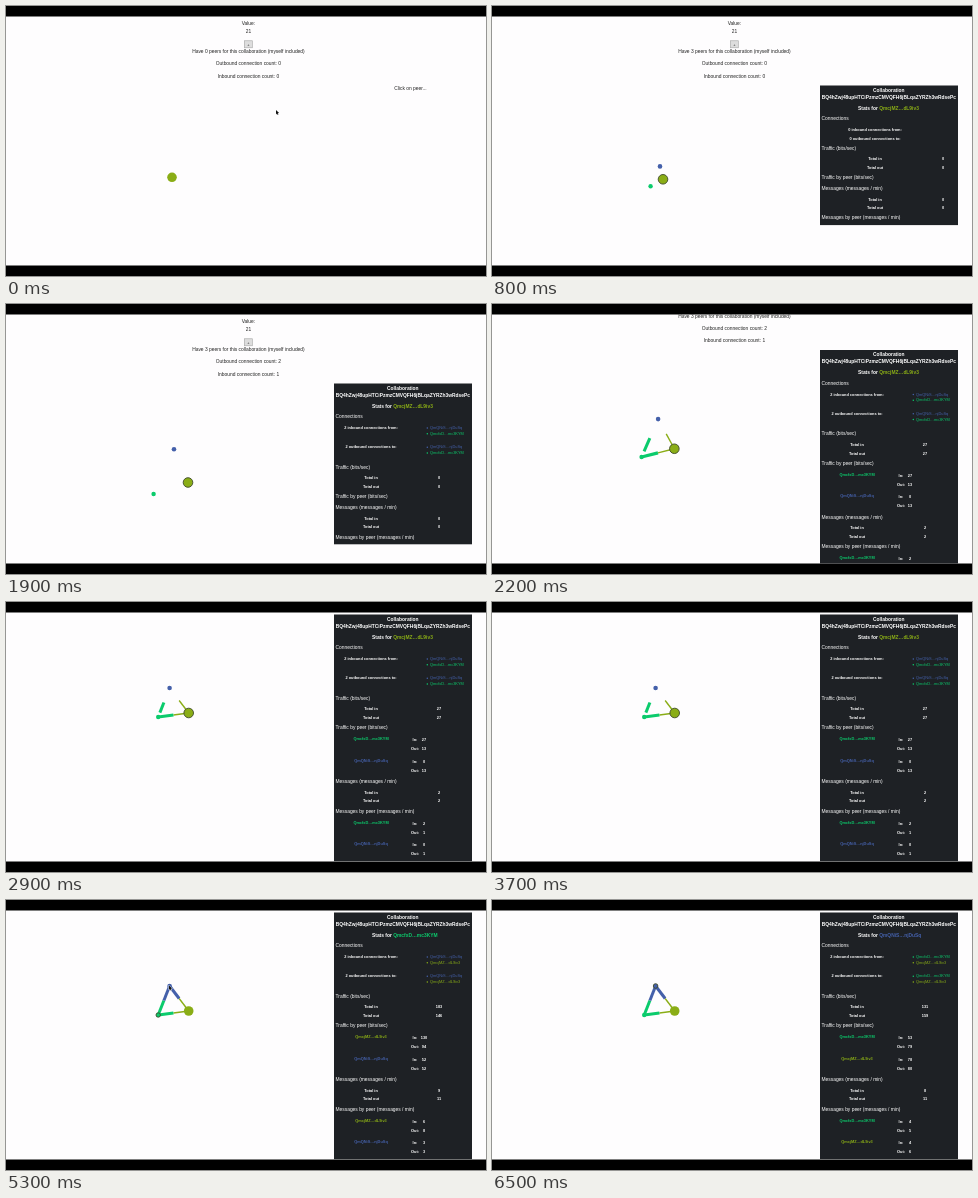
An HTML page with a canvas for the animation above (6.6 s loop, 480x270 px).

```html
<!DOCTYPE html>
<html lang="en">
<head>
<meta charset="utf-8">
<title>Peer collaboration</title>
<style>
html, body { margin: 0; width: 100%; height: 100%; overflow: hidden; background: #000; }
canvas { display: block; }
</style>
</head>
<body>
<canvas id="stage" width="480" height="270"></canvas>
<script>
const ctx = document.getElementById('stage').getContext('2d');
const LOOP = 6600, STEP = 100, SCROLL = 67;
const FONT = '"Liberation Sans", Arial, sans-serif';

// Each path is a list of [time, x, y] in page coordinates.
const peers = {
  olive: { id: 'QmcjMZ…dL9iv3', color: '#8aad16', r: 4.8,
    path: [[0, 166, 171.3], [500, 166, 171.3], [800, 171, 173.3], [1400, 180.5, 177.5], [1900, 182, 178.5], [2500, 182.7, 178]] },
  green: { id: 'QmcfxD…mc3KYM', color: '#0bcb6c', r: 2.2,
    path: [[500, 162, 176], [800, 158.6, 180.2], [1400, 149, 188.5], [1900, 147.6, 190], [2600, 152.2, 182]] },
  blue: { id: 'QmQNiS…njDuSq', color: '#4460aa', r: 2.3,
    path: [[500, 167, 165], [800, 168, 160.4], [1400, 168.2, 148], [1900, 168, 145.3], [2600, 163.6, 153]] }
};

// byPeer rows: name, traffic in/out, messages in/out
const stats = {
  olive: { list: ['blue', 'green'], traffic: [27, 27], messages: [2, 2],
    byPeer: [['green', 27, 13, 2, 1], ['blue', 0, 13, 0, 1]] },
  green: { list: ['blue', 'olive'], traffic: [183, 146], messages: [9, 11],
    byPeer: [['olive', 130, 94, 6, 8], ['blue', 52, 52, 3, 3]] },
  blue: { list: ['green', 'olive'], traffic: [131, 159], messages: [8, 11],
    byPeer: [['green', 53, 79, 4, 5], ['olive', 78, 80, 4, 6]] }
};

const clamp = v => Math.max(0, Math.min(1, v));
const smooth = v => v * v * (3 - 2 * v);

function along(path, t) {
  let i = 0;
  while (i < path.length - 2 && t > path[i + 1][0]) i++;
  const [t0, x0, y0] = path[i], [t1, x1, y1] = path[i + 1];
  const k = clamp((t - t0) / (t1 - t0));
  return [x0 + (x1 - x0) * k, y0 + (y1 - y0) * k];
}

function text(str, x, y, { size = 4.9, bold = false, color = '#fff', align = 'center' } = {}) {
  ctx.font = `${bold ? 'bold ' : ''}${size}px ${FONT}`;
  ctx.textAlign = align;
  ctx.textBaseline = 'middle';
  ctx.fillStyle = color;
  ctx.fillText(str, x, y);
}

function drawHeader(t) {
  const dark = { color: '#222' };
  const line = (str, y) => text(str, 242.4, y, dark);
  line('Value:', 17.3);
  line('21', 25.5);
  ctx.fillStyle = '#ddd';
  ctx.fillRect(238, 34.5, 8.5, 7.5);
  ctx.strokeStyle = '#aaa';
  ctx.lineWidth = 0.6;
  ctx.strokeRect(238.3, 34.8, 8, 7);
  text('+', 242.3, 38.4, { size: 4, color: '#222' });
  line(`Have ${t < 300 ? 0 : 3} peers for this collaboration (myself included)`, 45.8);
  line(`Outbound connection count: ${t < 1100 ? 0 : 2}`, 58);
  line(`Inbound connection count: ${t < 1500 ? 0 : 1}`, 70.4);
  if (t < 800) text('Click on peer...', 404.4, 82.5, dark);
}

function drawPanel(t, selected) {
  const data = stats[selected];
  const outbound = t < 1100 ? 0 : 2, inbound = t < 1500 ? 0 : 2;
  const flowing = t >= 2000;
  const rows = flowing ? data.byPeer : [];
  const shift = outbound ? 0 : 18;
  const small = (str, x, y, more) => text(str, x, y, { size: 3.9, bold: true, ...more });
  const heading = (str, y) => text(str, 329.5, y, { align: 'left' });
  const rowHeight = n => n ? 19.2 : 8.6;

  ctx.fillStyle = '#1e2125';
  ctx.fillRect(328, 79.5, 138, 139.6 - 17.2 + rowHeight(inbound) + rowHeight(outbound) + rows.length * 43);

  text('Collaboration', 396.8, 84.2, { bold: true });
  text('BQ4hZwj48upHTCiPzmzCMVQFH6jBLqaZYRZh3wRdsePc', 396.8, 91.4, { bold: true });
  text('Stats for ', 366, 102.5, { bold: true, align: 'left' });
  const idX = 366 + ctx.measureText('Stats for ').width;
  text(peers[selected].id, idX, 102.5, { bold: true, align: 'left', color: peers[selected].color });

  heading('Connections', 112.8);
  let y = 124;
  const connections = (n, label) => {
    small(`${n} ${label}`, 365 + shift, y);
    data.list.slice(0, n).forEach((name, i) => {
      const color = peers[name].color, rowY = y + i * 5.8;
      ctx.fillStyle = color;
      ctx.beginPath();
      ctx.arc(421.3, rowY, 0.75, 0, 7);
      ctx.fill();
      small(peers[name].id, 424, rowY, { bold: false, align: 'left', color });
    });
    y += rowHeight(n);
  };
  connections(inbound, 'inbound connections from:');
  connections(outbound, 'outbound connections to:');
  y += 1;

  const section = (title, unit, totals, col) => {
    heading(`${title} (${unit})`, y);
    ['in', 'out'].forEach((dir, i) => {
      small(`Total ${dir}`, 365 + shift, y + 11 + i * 8.6);
      small(flowing ? totals[i] : 0, 433 + shift, y + 11 + i * 8.6);
    });
    y += 29.4;
    heading(`${title} by peer (${unit})`, y);
    rows.forEach((row, i) => {
      const top = y + 12.3 + i * 21.5;
      small(peers[row[0]].id, 365, top - 0.9, { color: peers[row[0]].color });
      small('In:', 409, top);
      small('Out:', 409, top + 9.2);
      small(row[col], 418, top);
      small(row[col + 1], 418, top + 9.2);
    });
    y += 11 + rows.length * 21.5;
  };
  section('Traffic', 'bits/sec', data.traffic, 1);
  section('Messages', 'messages / min', data.messages, 3);
}

// Half an edge, from one peer up to the midpoint towards another.
function arm(from, to, t, width, start = 0) {
  const [x0, y0] = along(peers[from].path, t), [x1, y1] = along(peers[to].path, t);
  const at = k => [x0 + (x1 - x0) * k, y0 + (y1 - y0) * k];
  ctx.strokeStyle = peers[from].color;
  ctx.lineWidth = width;
  ctx.beginPath();
  ctx.moveTo(...at(start));
  ctx.lineTo(...at(0.5));
  ctx.stroke();
}

function drawGraph(t, selected) {
  if (t >= 2200) {
    const busy = t >= 4900;
    arm('olive', 'green', t, 1.4);
    arm('olive', 'blue', t, 1.4);
    arm('green', 'olive', t, 3.2);
    arm('green', 'blue', t, 3, busy ? 0 : 0.15);
    if (busy) {
      arm('blue', 'green', t, 3);
      arm('blue', 'olive', t, 3);
    }
  }
  for (const [name, p] of Object.entries(peers)) {
    if (t < p.path[0][0]) continue;
    ctx.beginPath();
    ctx.arc(...along(p.path, t), p.r, 0, 7);
    ctx.fillStyle = p.color;
    ctx.fill();
    if (name === selected) {
      ctx.strokeStyle = '#3f4a2c';
      ctx.lineWidth = 0.9;
      ctx.stroke();
    }
  }
}

function drawCursor(t) {
  let path;
  if (t < 800) path = [[200, 270, 104], [700, 169, 171]];
  else if (t >= 3800 && t < 4900) path = [[3800, 182, 111], [4400, 151.5, 115]];
  else if (t >= 4900 && t < 5900) path = [[4900, 151.5, 115], [5200, 163, 85.5]];
  else if (t >= 5900 && t < 6200) path = [[5800, 163, 85.5], [6100, 172, 17]];
  else return;
  const [x, y] = along(path, t);
  ctx.beginPath();
  for (const [dx, dy] of [[0, 0], [0, 4.4], [1, 3.5], [1.7, 5], [2.4, 4.7], [1.8, 3.2], [3.1, 3.1]])
    ctx.lineTo(x + dx, y + dy);
  ctx.closePath();
  ctx.strokeStyle = '#fff';
  ctx.lineWidth = 0.8;
  ctx.stroke();
  ctx.fillStyle = '#111';
  ctx.fill();
}

function draw(t) {
  const selected = t < 800 ? null : t < 4700 ? 'olive' : t < 5800 ? 'green' : 'blue';
  ctx.fillStyle = '#000';
  ctx.fillRect(0, 0, 480, 270);
  ctx.save();
  ctx.beginPath();
  ctx.rect(0, 10.5, 480, 249);
  ctx.clip();
  ctx.fillStyle = '#fefdfe';
  ctx.fillRect(0, 10, 480, 250);
  ctx.save();
  ctx.translate(0, -SCROLL * smooth(clamp((t - 2000) / 400)));
  drawHeader(t);
  drawGraph(t, selected);
  if (selected) drawPanel(t, selected);
  ctx.restore();
  drawCursor(t);
  ctx.restore();
}

const begin = performance.now();
function tick() {
  const t = (performance.now() - begin) % LOOP;
  draw(Math.floor(t / STEP) * STEP);
  requestAnimationFrame(tick);
}
tick();
</script>
</body>
</html>
```
